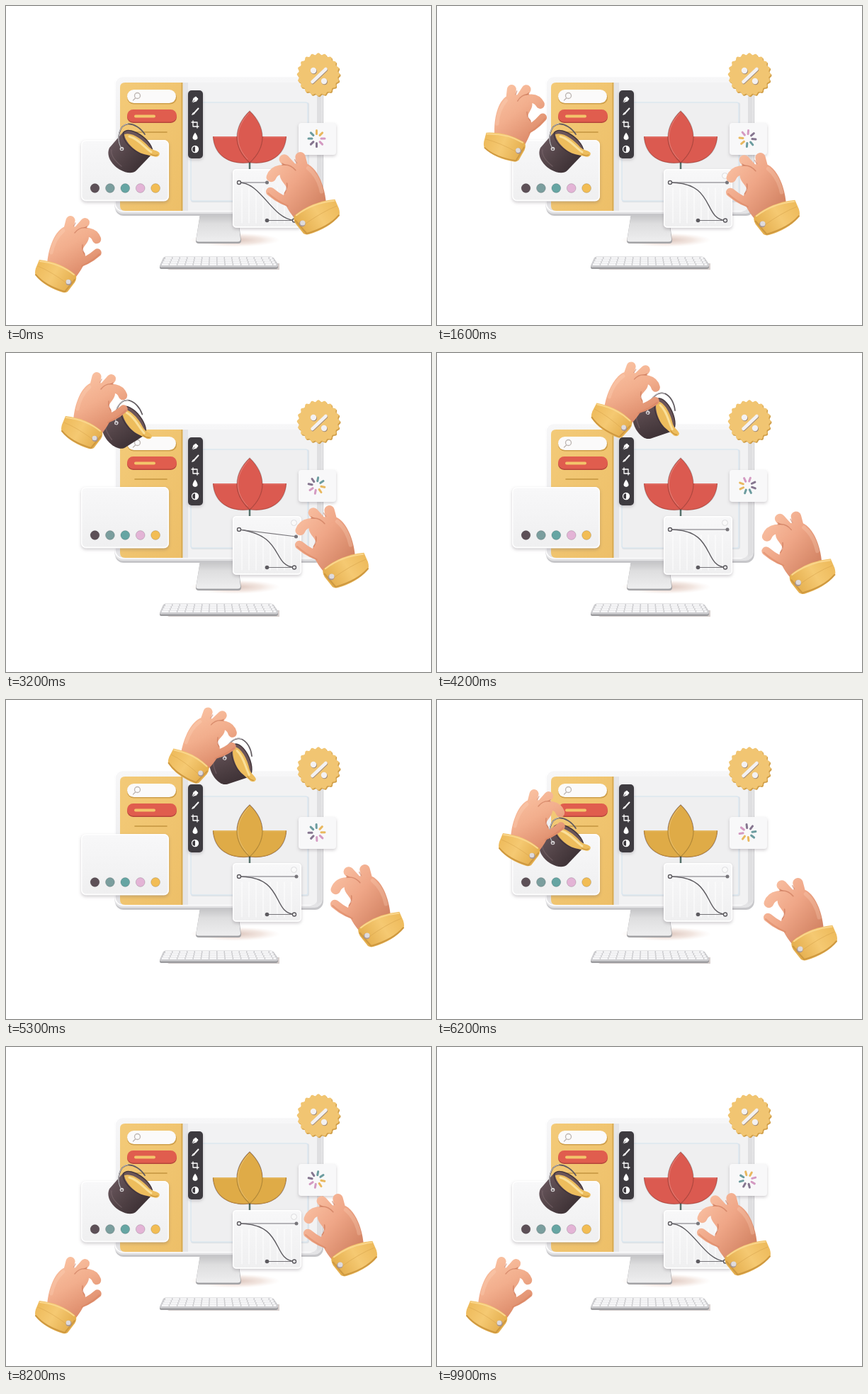
An HTML page for the animation above (10 s loop, 600 by 450 pixels).

```html
<!DOCTYPE html>
<html lang="en">
<head>
<meta charset="utf-8">
<title>Design workspace</title>
<style>
  html, body { margin: 0; width: 100%; height: 100%; overflow: hidden; background: #fff; }
  svg { display: block; width: 600px; height: 450px; }
  .card { filter: drop-shadow(0 2px 2px rgba(70, 60, 70, .25)); }
  .line { fill: none; stroke-linecap: round; stroke-linejoin: round; }
  #left { --skin: url(#skinLeft); }
  #right { --skin: url(#skinRight); }
  .finger { stroke: var(--skin); }
  .palm { fill: var(--skin); }
  .crease { stroke: #c0684a; stroke-width: 1.4; opacity: .5; }
  .node { fill: #fff; stroke: #5d5b60; stroke-width: 1.4; }
</style>
</head>
<body>
<svg viewBox="0 0 600 450">
  <defs>
    <linearGradient id="skinLeft" gradientUnits="userSpaceOnUse" x1="72" y1="300" x2="112" y2="372">
      <stop stop-color="#fac2a2"/><stop offset=".5" stop-color="#f2ae8d"/><stop offset="1" stop-color="#de8d6c"/>
    </linearGradient>
    <linearGradient id="skinRight" gradientUnits="userSpaceOnUse" x1="126" y1="310" x2="62" y2="362">
      <stop stop-color="#f8bd9f"/><stop offset=".45" stop-color="#efa687"/><stop offset="1" stop-color="#d38464"/>
    </linearGradient>
    <linearGradient id="cuff" gradientUnits="userSpaceOnUse" x1="45" y1="365" x2="95" y2="395">
      <stop stop-color="#eebb5c"/><stop offset=".45" stop-color="#f5c972"/><stop offset="1" stop-color="#e3ac4b"/>
    </linearGradient>
    <linearGradient id="frame" x2="0" y2="1">
      <stop stop-color="#f7f7f8"/><stop offset=".6" stop-color="#ededef"/><stop offset="1" stop-color="#e3e3e5"/>
    </linearGradient>
    <linearGradient id="neck" x2="0" y2="1">
      <stop stop-color="#c3c3c5"/><stop offset=".35" stop-color="#dededf"/><stop offset="1" stop-color="#eeeeef"/>
    </linearGradient>
    <linearGradient id="panel" x2="1" y2="1">
      <stop stop-color="#f3ca78"/><stop offset="1" stop-color="#edbf68"/>
    </linearGradient>
    <linearGradient id="paper" x2="0" y2="1">
      <stop stop-color="#f8f8f9"/><stop offset="1" stop-color="#efeff0"/>
    </linearGradient>
    <linearGradient id="tin" gradientUnits="userSpaceOnUse" x1="148" y1="195" x2="190" y2="232">
      <stop stop-color="#66545a"/><stop offset=".45" stop-color="#524347"/><stop offset="1" stop-color="#3c3034"/>
    </linearGradient>
    <radialGradient id="ground">
      <stop stop-color="#d3b7ac" stop-opacity=".85"/><stop offset=".6" stop-color="#ead6cd" stop-opacity=".6"/>
      <stop offset="1" stop-color="#f5e8e2" stop-opacity="0"/>
    </radialGradient>

    <g id="flower">
      <path d="M292 184H334L344 221C315 225 294 211 292 184ZM396 184H354L344 221C373 225 394 211 396 184Z" fill="currentColor"/>
      <path class="line" d="M292.500 185C294 211 315 224 344 221C373 224 394 211 395.500 185" stroke="#000" stroke-opacity=".16" stroke-width="1.500"/>
      <path d="M344 148C320 171 320 199 344 221C368 199 368 171 344 148Z" fill="currentColor"/>
      <path class="line" d="M344 148C320 171 320 199 344 221C368 199 368 171 344 148Z" stroke="#000" stroke-opacity=".2" stroke-width="1.200"/>
      <path class="line" d="M343 151C323 172 322 196 341 216M294 185H325M364 185H394" stroke="#fff" stroke-opacity=".22" stroke-width="1"/>
    </g>

    <g id="hand">
      <path class="line finger" d="M86 322L91 302.500" stroke-width="13"/>
      <path class="line finger" d="M97 322L111.500 305.500" stroke-width="13"/>
      <path class="line crease" d="M95 312L98 306M106 316L114 311"/>
      <path class="palm" d="M58 366C59 345 67 320 81 312C95 308 112 313 117 326C117 334 109 338 108 345C116 352 113 364 99 382Z"/>
      <path class="line finger" d="M98 363.500C111 362 121 355 129 348" stroke-width="11.500"/>
      <path class="line finger" d="M101 324C111 316 124 318 128 329" stroke-width="12.500"/>
      <path class="line crease" d="M97 320Q104 311 114 313M108 337Q107 344 111 350"/>
      <path class="line" d="M64 348Q68 328 81 317" stroke="#ffdac2" stroke-width="5" opacity=".25"/>
      <path class="line" d="M107 367Q123 359 132 350" stroke="#d6805e" stroke-width="2" opacity=".45"/>
      <path d="M47 358Q77 361 98 379Q101 383 97 390L87 403Q84 405 80 404Q54 396 42 380Q40 377 42 370Z" fill="url(#cuff)"/>
      <path class="line" d="M42 379Q55 395 83 403L97 386" stroke="#cf9940" stroke-width="2"/>
      <path class="line" d="M48 360Q76 363 96 379" stroke="#fad68c" stroke-width="2"/>
      <path class="line" d="M45 367Q63 374 87 392" stroke="#d4a04a" stroke-width=".8" opacity=".6"/>
      <circle cx="88.500" cy="390" r="4" fill="#a99691"/><circle cx="88" cy="389" r="3.300" fill="#dedbdd"/>
    </g>
  </defs>

  <ellipse cx="323" cy="330" rx="64" ry="10" fill="url(#ground)"/>
  <path d="M274 294H327L332 331Q332 335 328 335H272Q268 335 268 331Z" fill="#a3a3a6"/>
  <path d="M274 294H327L331 329Q331 332.500 327 332.500H272Q268 332.500 268.500 329Z" fill="url(#neck)"/>

  <!-- monitor -->
  <rect x="154" y="101" width="294" height="195" rx="12" fill="#c6c6c9"/>
  <rect x="153" y="99" width="294" height="194" rx="12" fill="url(#frame)"/>
  <rect x="154" y="99.500" width="285" height="190" rx="11" fill="none" stroke="#fff" stroke-width="1.500"/>
  <path d="M439 108L446 104V284L439 288Z" fill="#dfdfe1"/>
  <rect x="161" y="108" width="278" height="181" rx="7" fill="#f2f2f3"/>
  <path d="M168 108H249V289H168Q161 289 161 282V115Q161 108 168 108Z" fill="url(#panel)"/>
  <path d="M247.500 108H249.500V289H247.500Z" fill="#d5a850"/>
  <path d="M250 108H257V289H250Z" fill="#dedee0" opacity=".6"/>
  <rect x="261" y="136" width="167" height="141" rx="3" fill="#d6dae0" opacity=".7"/>
  <rect x="261" y="136" width="165" height="139" rx="3" fill="#efeff0" stroke="#dbe7f0" stroke-width="1.500"/>

  <rect x="171" y="120" width="70" height="18.500" rx="9" fill="#ce9f4b"/>
  <rect x="171" y="118" width="69" height="19" rx="9.500" fill="#fbfafa"/>
  <g class="line" stroke="#bcb5b2" stroke-width="1.300"><circle cx="185.500" cy="126.500" r="4"/><path d="M182.500 130L179.500 133"/></g>
  <rect x="171" y="148" width="70" height="17" rx="8.500" fill="#b5463b"/>
  <rect x="171" y="146" width="70" height="17.500" rx="8.500" fill="#e05d4e"/>
  <path class="line" d="M183 155.500H209" stroke="#f3c56b" stroke-width="4"/>
  <path class="line" d="M182 178H227" stroke="#c3953f" stroke-width="1.600"/>

  <g class="card">
    <rect x="257" y="119" width="21" height="96" rx="5" fill="#3e3b40"/>
    <path d="M262 137L264 130L268 127L272 131L269 135ZM262 137L266.500 132.500" fill="#fff" stroke="#3e3b40" stroke-width=".8"/>
    <path class="line" d="M271.500 144.500L267 149.500" stroke="#fff" stroke-width="2"/>
    <path d="M267 149Q268 153 262 154Q263 150 267 149Z" fill="#fff"/>
    <path class="line" d="M264 162V170H272M262 164H270V172" stroke="#fff" stroke-width="1.300"/>
    <path d="M267 178.500Q274 188 267 189Q260 188 267 178.500Z" fill="#fff"/>
    <circle class="line" cx="267" cy="202" r="4.500" stroke="#fff" stroke-width="1.300"/>
    <path d="M267 197.500A4.500 4.500 0 0 1 267 206.500Z" fill="#fff"/>
  </g>

  <path class="line" d="M344 190V233" stroke="#56716b" stroke-width="2.500"/>
  <use href="#flower" color="#db5a50"/>
  <use id="gold" href="#flower" color="#dfab47"/>

  <!-- badge -->
  <path class="scallop" transform="translate(442.300 98)" fill="#d19f49"/>
  <path class="scallop" transform="translate(441 96.500)" fill="#f1c572"/>
  <g class="line" stroke-width="4.500">
    <path d="M433 108L452 90" stroke="#a58d76"/><path d="M432.500 107L451.500 89" stroke="#f3f1f2"/>
  </g>
  <g fill="#a58d76"><circle cx="434.700" cy="92" r="4.300"/><circle cx="449.700" cy="107" r="4.300"/></g>
  <g fill="#f3f1f2"><circle cx="434" cy="91" r="4.200"/><circle cx="449" cy="106" r="4.200"/></g>

  <!-- swatches -->
  <g class="card">
    <rect x="106" y="189" width="124" height="86.500" rx="7" fill="url(#paper)"/>
    <rect x="106.700" y="189.700" width="122.600" height="84.600" rx="6.500" fill="none" stroke="#fff" stroke-width="1.400"/>
  </g>
  <g id="dots"></g>

  <!-- loader -->
  <g class="card"><rect x="413" y="165" width="53" height="45" rx="4" fill="#f8f8f9"/></g>
  <g id="rays" class="line" stroke-width="3"></g>

  <!-- curve editor -->
  <g class="card"><rect x="320" y="230" width="97" height="83" rx="5" fill="url(#paper)"/></g>
  <rect x="320.700" y="230.700" width="95.600" height="81" rx="4.500" fill="none" stroke="#fff" stroke-width="1.400"/>
  <path id="grid" class="line" stroke="#fff" stroke-width="1.400" opacity=".7"/>
  <circle cx="406.500" cy="239.500" r="4" fill="#fafafa" stroke="#dcdcde"/>
  <path id="curve" class="line" stroke="#5d5b60" stroke-width="1.400"/>
  <path id="arm" class="line" stroke="#77757a" stroke-width="1.200"/>
  <path class="line" d="M368 302.500H407" stroke="#77757a" stroke-width="1.200"/>
  <circle class="node" cx="329" cy="249" r="2.500"/>
  <circle class="node" cx="407" cy="302.500" r="2.500"/>
  <circle cx="368.500" cy="302.500" r="2.800" fill="#5d5b60"/>
  <circle id="grip" r="2.500" fill="#77757a"/>

  <!-- keyboard -->
  <path d="M222 368L386 363V372H230Z" fill="#d8d0ce"/>
  <path d="M217 366L384 363.500V368Q384 371 381 371H219Q217 371 217 369Z" fill="#9c9c9f"/>
  <path d="M225 353.500H374Q377 353.500 378.500 356L384 364Q385 368.500 380 368.500H220Q216 368.500 217.500 365L221.500 356Q222.500 353.500 225 353.500Z" fill="#cdcdd0"/>
  <g id="keys" class="line" stroke="#fafafb" stroke-width="2.400" style="stroke-linecap:butt"></g>

  <!-- paint bucket -->
  <g id="bucket">
    <path d="M166 177L146 200C140 213 152 226 161 231C170 236 179 237 184 232L206 209Z" fill="url(#tin)"/>
    <path class="line" d="M149 203Q147 213 163 226" stroke="#7b686d" stroke-width="1.500" opacity=".6"/>
    <ellipse cx="186" cy="193" rx="25.500" ry="12" transform="rotate(38 186 193)" fill="#40343a"/>
    <ellipse cx="186" cy="193" rx="24" ry="10.500" transform="rotate(38 186 193)" fill="#6b5559"/>
    <path d="M167 181C177 177 193 188 202 199C207 204 213 203 216.500 207C218 212 212 214 208 212C203 211 199 210 195 209C183 206 168 192 167 181Z" fill="#edbd5d"/>
    <path class="line" d="M174 184C186 187 194 198 205 206" stroke="#fae09a" stroke-width="3"/>
    <path class="line" d="M204 209Q210 212 214 210" stroke="#cb943b" stroke-width="1.300"/>
    <path class="line" d="M163 201C155 187 160 168 172 166.500C181 166 190 172 196 181" stroke="#615b60" stroke-width="1.700"/>
    <path class="line" d="M162 199C155 186 160 168 172 166" stroke="#c9c6c9" stroke-width="1"/>
    <circle cx="163.500" cy="201.500" r="2.800" fill="#d8d4d6"/><circle cx="163.500" cy="202" r="1.300" fill="#665a5f"/>
  </g>
  <use id="left" href="#hand"/>
  <use id="right" href="#hand"/>
</svg>

<script>
  const LOOP = 10000, STEP = 100;
  const GRAB = 2250, DROP = 6200;
  const $ = id => document.getElementById(id);
  const range = n => [...Array(n).keys()];
  const set = (id, name, value) => $(id).setAttribute(name, value);

  // Rows are [time, ...values].
  const leftKeys = [
    [0, 41, 296, 0], [200, 38, 288, 0], [600, 27, 240, -3], [1100, 42, 155, -7],
    [1600, 62, 111, -8], [2000, 82, 123, -2], [GRAB, 87, 126, 0], [2500, 82, 117, 0],
    [2850, 69, 72, 0], [3200, 78, 27, 0], [3400, 94, 18, 1], [3800, 162, 13, 4],
    [4200, 220, 12, 5], [4500, 231, 10, 5], [5350, 231, 10, 5], [5600, 203, 24, 3],
    [5900, 118, 88, 0], [DROP, 87, 126, 0], [6600, 69, 150, 0], [7000, 50, 226, 0],
    [7400, 42, 284, 0], [7700, 41, 296, 0], [LOOP, 41, 296, 0]
  ];
  const rightKeys = [
    [0, 366, 206], [200, 369, 206], [600, 384, 205], [1100, 401, 205], [1600, 407, 207],
    [3200, 407, 215], [3400, 409, 217], [3800, 435, 222], [4300, 459, 224], [5300, 457, 232],
    [6200, 460, 251], [6700, 463, 257], [7300, 464, 249], [7800, 462, 228], [8200, 419, 207],
    [8500, 408, 206], [8800, 402, 206], [9300, 383, 206], [9800, 366, 206], [LOOP, 366, 206]
  ];
  const gripKeys = [[0, 249], [1600, 249], [3200, 259], [3500, 249], [LOOP, 249]];
  const tiltKeys = [[0, 0], [GRAB, 0], [3200, 14], [4300, 23], [5300, 23], [DROP, 0], [LOOP, 0]];
  const goldKeys = [[0, 0], [4500, 0], [4900, 1], [8900, 1], [9400, 0], [LOOP, 0]];

  // Smooth interpolation that never overshoots its keys.
  function at(keys, t) {
    const i = Math.max(0, keys.findIndex(k => k[0] > t) - 1);
    const a = keys[i], b = keys[i + 1], span = b[0] - a[0], u = (t - a[0]) / span;
    return a.slice(1).map((from, n) => {
      const c = n + 1;
      const slope = j => keys[j] && keys[j + 1]
        ? (keys[j + 1][c] - keys[j][c]) / (keys[j + 1][0] - keys[j][0]) : 0;
      const tangent = j => {
        const p = slope(j - 1), q = slope(j);
        return p * q > 0 ? 2 * p * q / (p + q) : 0;
      };
      const d = b[c] - from;
      return from + d * u * u * (3 - 2 * u)
        + span * (tangent(i) * u * (1 - u) ** 2 - tangent(i + 1) * u * u * (1 - u));
    });
  }

  function build() {
    const rim = range(160).map(i => {
      const a = i * Math.PI / 80, r = 29 + 1.3 * Math.cos(20 * a);
      return `${(r * Math.cos(a)).toFixed(2)} ${(r * Math.sin(a)).toFixed(2)}`;
    });
    document.querySelectorAll(".scallop").forEach(p => p.setAttribute("d", `M${rim.join("L")}Z`));

    $("dots").innerHTML = ["#5d5057", "#7b9e9e", "#66a5a3", "#e3b4d6", "#f2bd55"].map((c, i) => {
      const x = 125.5 + 21.4 * i;
      return `<circle cx="${x}" cy="257" r="6.400" fill="${c}" stroke="#000" stroke-opacity=".15"/>`;
    }).join("");

    const hues = ["#e9b85f", "#d49ac2", "#85758f", "#6c9c9f"];
    $("rays").innerHTML = range(8).map(i =>
      `<path d="M438.500 180.500V175.500" stroke="${hues[i >> 1]}" transform="rotate(${i * 45} 438.500 187)"/>`).join("");

    set("grid", "d", range(8).map(i => `M${333 + 10 * i} 257V306`).join(""));
    $("keys").innerHTML = range(4).map(i =>
      `<path d="M${225 - 1.7 * i} ${355.5 + 3 * i}H${376 + 1.8 * i}" stroke-dasharray="${9 + .25 * i} 1.500"/>`).join("");
  }

  function draw(t) {
    const [x, y, turn] = at(leftKeys, t);
    const pose = `translate(${x} ${y}) rotate(${turn} 47 54)`;
    set("left", "transform", `${pose} translate(-41 -296)`);
    const carry = t >= GRAB && t <= DROP ? `${pose} translate(-87 -126)` : "";
    set("bucket", "transform", `${carry} rotate(${at(tiltKeys, t)[0]} 180 205)`);

    const [rx, ry] = at(rightKeys, t);
    set("right", "transform", `translate(${rx + 105} ${ry}) scale(-1.110 1.075) translate(-41 -296)`);

    const gx = Math.min(410, rx + 2.5), gy = at(gripKeys, t)[0];
    const bendX = 329 + .8 * (gx - 329), bendY = 249 + .8 * (gy - 249);
    set("curve", "d", `M329 249C${bendX} ${bendY} 375 300 407 302.500`);
    set("arm", "d", `M329 249L${gx} ${gy}`);
    set("grip", "cx", gx);
    set("grip", "cy", gy);

    set("gold", "opacity", at(goldKeys, t)[0]);
    set("rays", "transform", `rotate(${t * 360 / 2500} 438.500 187)`);
  }

  build();
  const start = performance.now();
  function tick() {
    const t = (performance.now() - start) % LOOP;
    draw(Math.floor(t / STEP) * STEP);
    requestAnimationFrame(tick);
  }
  tick();
</script>
</body>
</html>
```
